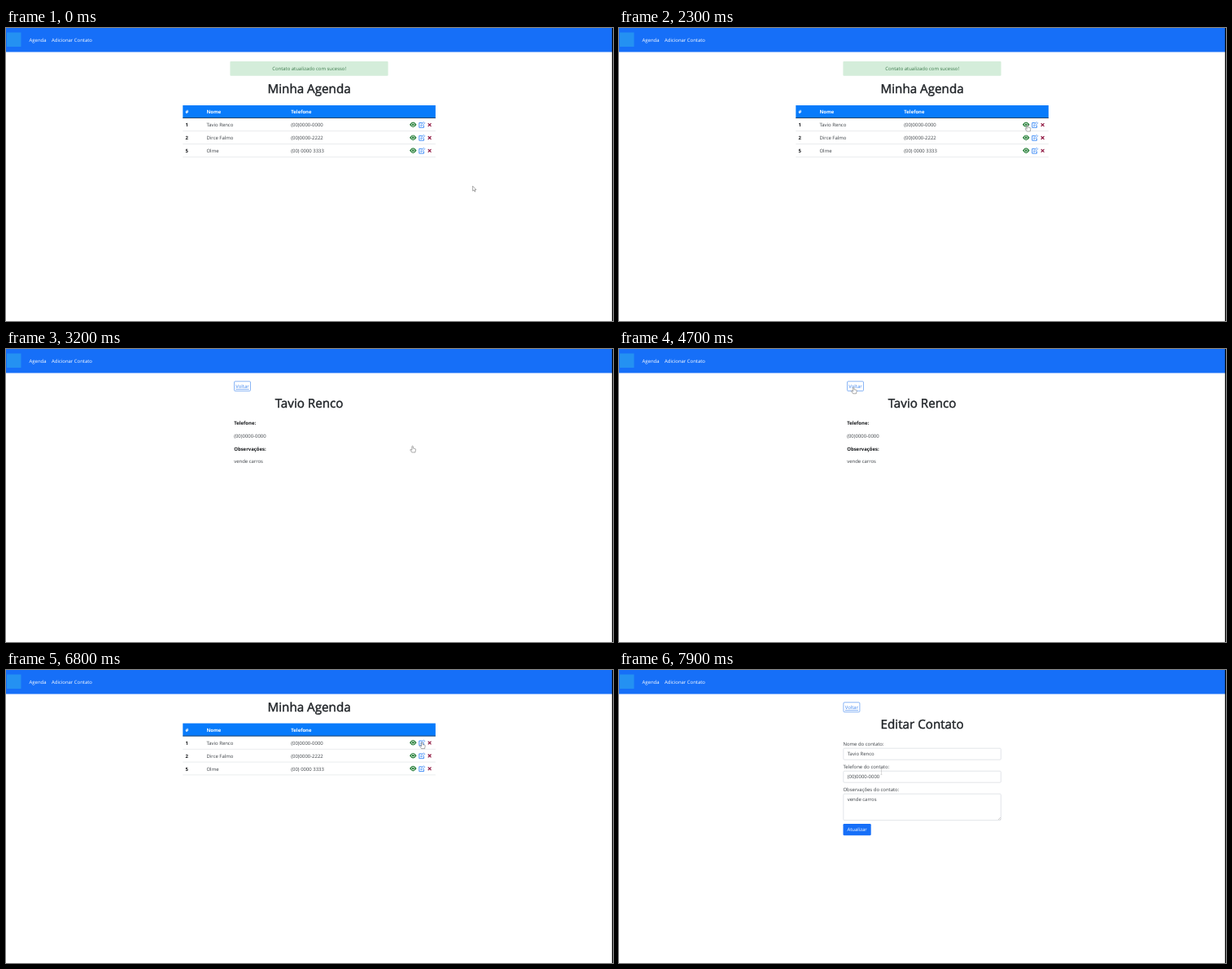
Write an HTML page that moves like this. It is 746 by 360 pixels and loops after 8000 ms.

```html
<!DOCTYPE html>
<html lang="pt-BR">
<head>
<meta charset="utf-8">
<title>Minha Agenda</title>
<style>
  html, body { margin: 0; width: 100%; height: 100%; overflow: hidden; background: #fff; }
  svg { display: block; width: 746px; height: 360px; }
  text { font: 5.95px "Open Sans", "Noto Sans", sans-serif; fill: #3a3f44; text-rendering: geometricPrecision; }
  .title { font-size: 15.2px; fill: #212529; stroke: #212529; stroke-width: .45; text-anchor: middle; }
  .bold { font-weight: 700; fill: #17191c; }
  .light { fill: #fff; }
  .middle { text-anchor: middle; }
  .success { fill: #3d7a4d; }
  .link { fill: #3b83ee; }
  .underlined { text-decoration: underline .4px; }
  .button { fill: #fff; stroke: #3b83ee; stroke-width: .6; }
  .field { fill: #fff; stroke: #ced4da; stroke-width: .6; }
</style>
</head>
<body>
<svg viewBox="0 0 746 360">
  <defs>
    <g id="eye">
      <path d="M-4.3 0Q0-6.6 4.3 0Q0 6.6-4.3 0Z" fill="#28803a"/>
      <circle r="2.1" fill="#fff"/>
      <circle r="1.4" fill="#28803a"/>
    </g>
    <g id="edit" fill="none" stroke="#3586f5">
      <path d="M.6-2.5H-3.2V3.3H2.5V.6" stroke-width=".9" stroke-linejoin="round"/>
      <path d="M-1.2 1.3L-.9-.3L2.4-3.5L3.7-2.2L.4 1.1Z" stroke-width=".75"/>
    </g>
    <path id="remove" d="M-1.9-1.9L1.9 1.9M1.9-1.9L-1.9 1.9" stroke="#8f1740" stroke-width="1.2"/>
    <path id="arrow" d="M0 0V6L1.4 4.8L2.4 7L3.4 6.5L2.5 4.4H4.3Z"/>
    <path id="hand" d="M-.7.6Q0-.4.7.6V3L3.2 3.5Q4 3.7 3.9 4.6L3.3 8H-.7L-2.8 5.1Q-2.9 4.2-2 4.4L-.7 5.3Z"/>
    <path id="beam" d="M-1-3.4H1M0-3.4V3.4M-1 3.4H1" stroke-width=".2"/>
  </defs>
  <rect width="746" height="29.5" fill="#166ff8"/>
  <rect x="1" y="5.5" width="17.5" height="17.5" fill="#2491f2"/>
  <text x="28.6" y="17.1" class="light">Agenda</text>
  <text x="56.1" y="17.1" class="light">Adicionar Contato</text>
  <g id="list"></g>
  <g id="details"></g>
  <g id="form"></g>
  <rect x="744.8" width="1.2" height="360"/>
  <use id="cursor" fill="#fff" stroke="#555" stroke-width=".5"/>
</svg>
<script>
const LOOP = 8000, STEP = 100;
const CENTER = 372.6, TABLE_X = 217.3, TABLE_WIDTH = 310.6, ROW_HEIGHT = 15.9, ALERT_SPACE = 29.5;
const COLUMNS = [220.5, 246.5, 350.3];
const PERSON = 'Tavio Renco', PHONE = '(00)0000-0000', NOTE = 'vende carros';
const CONTACTS = [
  [1, PERSON, PHONE],
  [2, 'Dirce Falmo', '(00)0000-2222'],
  [5, 'Olme', '(00) 0000 3333'],
];
const $ = id => document.getElementById(id);

const text = (x, y, content, style = '') => `<text x="${x}" y="${y}" class="${style}">${content}</text>`;
const rect = (x, y, w, h, attrs) => `<rect x="${x}" y="${y}" width="${w}" height="${h}" ${attrs}/>`;
const icon = (id, x, y) => `<use href="#${id}" x="${x}" y="${y}"/>`;
const title = (y, content) => text(CENTER, y, content, 'title');
const cells = (y, values, style) =>
  values.map((value, i) => text(COLUMNS[i], y, value, style(i))).join('');
const backButton = x =>
  rect(x + .3, 39.8, 20, 11.8, 'rx="1.2" class="button"') +
  text(x + 10.3, 48, 'Voltar', 'link middle back');
const field = (label, value, y, h) =>
  text(275.5, y - 2.6, label) +
  rect(275.8, y + .2, 193.6, h, 'rx="1.2" class="field"') +
  text(280.8, y + 9.4, value);

function row(contact, i) {
  const y = 119 + i * ROW_HEIGHT;
  return cells(y + 2.2, contact, column => column ? '' : 'bold') +
    icon('eye', 500.3, y - .2) + icon('edit', 511, y) + icon('remove', 520.6, y) +
    rect(TABLE_X, y + 7.4, TABLE_WIDTH, .5, 'fill="#d5d9dd"');
}

$('list').innerHTML =
  `<g id="alert">${rect(275.4, 41, 194.2, 17.8, 'rx="1" fill="#d4edda"')}
  ${text(CENTER, 52.2, 'Contato atualizado com sucesso!', 'success middle')}</g>` +
  title(80.2, 'Minha Agenda') +
  rect(TABLE_X, 95, TABLE_WIDTH, 15.8, 'fill="#087bfb"') +
  rect(TABLE_X, 110.1, TABLE_WIDTH, .9, 'fill="#24405f"') +
  cells(105.1, ['#', 'Nome', 'Telefone'], () => 'bold light') +
  CONTACTS.map(row).join('');

$('details').innerHTML = backButton(280.2) + title(71.6, PERSON) +
  ['Telefone:', PHONE, 'Observações:', NOTE]
    .map((line, i) => text(280.2, 93.3 + i * 15.6, line, i % 2 ? '' : 'bold')).join('');

$('form').innerHTML = backButton(275.6) + title(71.6, 'Editar Contato') +
  field('Nome do contato:', PERSON, 96, 14) +
  field('Telefone do contato:', PHONE, 124, 14) +
  field('Observações do contato:', NOTE, 152, 32.4) +
  '<path d="M466 184L469 181M467.8 184L469 182.8" stroke="#888" stroke-width=".4"/>' +
  rect(275.5, 189, 34.2, 14.3, 'rx="1.3" fill="#166ff8"') +
  text(292.6, 198.3, 'Atualizar', 'light middle');

// The pointer glides to each stop as an arrow and takes the given shape on arrival.
const START = { x: 573.6, y: 194.2, shape: 'arrow' };
const STOPS = [
  { from: 0, to: 300, x: 514, y: 185 },
  { from: 400, to: 800, x: 306, y: 149 },
  { from: 800, to: 1300, x: 484, y: 148 },
  { from: 1300, to: 1800, x: 515, y: 121 },
  { from: 2000, to: 2300, x: 502, y: 119, shape: 'hand' },
  { from: 2600, to: 2700, x: 499.6, y: 119, shape: 'hand' },
  { from: 3400, to: 4400, x: 288.3, y: 46.8, shape: 'hand' },
  { from: 4700, to: 5500, x: 500, y: 98 },
  { from: 5500, to: 6000, x: 515, y: 91 },
  { from: 6100, to: 6200, x: 511.3, y: 88.6, shape: 'hand' },
  { from: 6800, to: 7400, x: 375, y: 116, shape: 'beam' },
  { from: 7500, to: 7900, x: 322.5, y: 125, shape: 'beam' },
];
const CLICKS = { view: 3200, back: 4800, edit: 6900 };

const smooth = k => k * k * (3 - 2 * k);

function pointerAt(t) {
  const index = STOPS.findLastIndex(stop => stop.from <= t);
  const stop = STOPS[index], previous = STOPS[index - 1] ?? START;
  const progress = Math.min(1, (t - stop.from) / (stop.to - stop.from));
  const k = smooth(progress);
  const { shape = 'arrow' } = progress === 0 ? previous : progress === 1 ? stop : START;
  return {
    x: previous.x + (stop.x - previous.x) * k,
    y: previous.y + (stop.y - previous.y) * k,
    shape,
  };
}

function pageAt(t) {
  if (t >= CLICKS.edit) return 'form';
  return t >= CLICKS.view && t < CLICKS.back ? 'details' : 'list';
}

function draw() {
  const t = Math.floor(performance.now() % LOOP / STEP) * STEP;
  const page = pageAt(t), returned = t >= CLICKS.back;
  for (const id of ['list', 'details', 'form']) $(id).style.display = id === page ? '' : 'none';
  $('alert').style.display = returned ? 'none' : '';
  $('list').setAttribute('transform', `translate(0 ${returned ? -ALERT_SPACE : 0})`);

  const { x, y, shape } = pointerAt(t);
  $('cursor').setAttribute('href', '#' + shape);
  $('cursor').setAttribute('transform', `translate(${x} ${y})`);
  const hovering = page === 'details' && x < 300;
  document.querySelectorAll('.back').forEach(el => el.classList.toggle('underlined', !hovering));
  requestAnimationFrame(draw);
}
draw();
</script>
</body>
</html>
```
